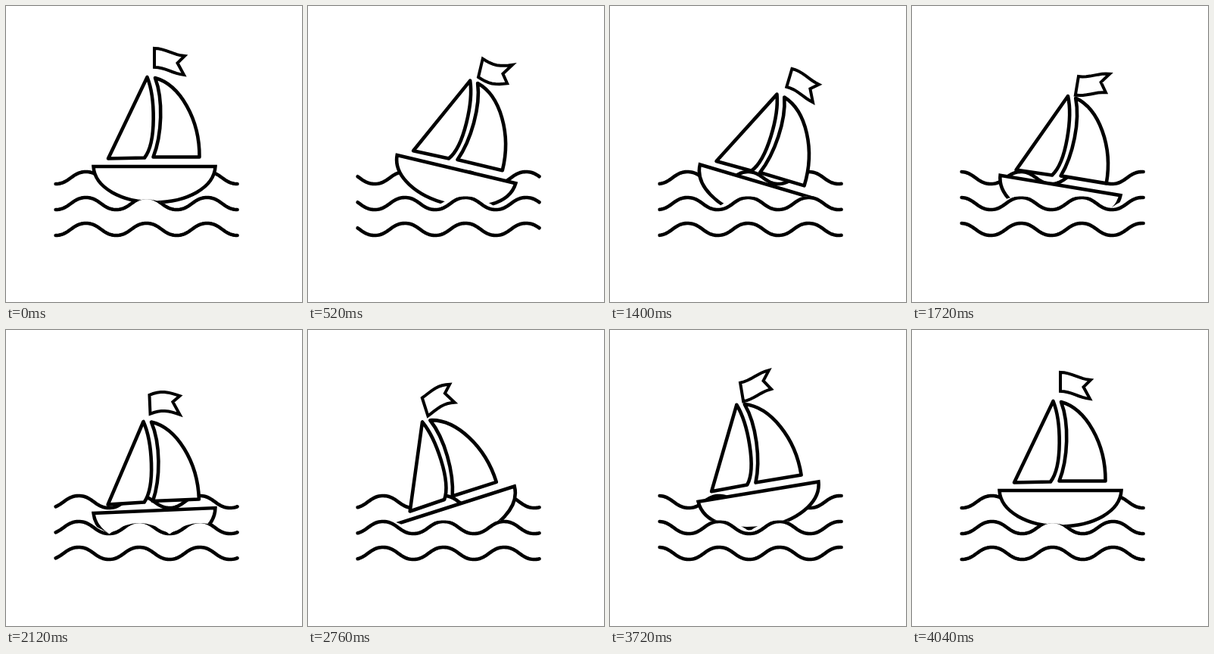
Animation of 391 by 391 pixels, one loop 4.08 s. Source, as an HTML page with a canvas:

```html
<!DOCTYPE html>
<html lang="en">
<head>
<meta charset="utf-8">
<title>Sailing boat</title>
<style>
html, body { margin: 0; width: 100%; height: 100%; overflow: hidden; background: #fff; }
canvas { display: block; width: 391px; height: 391px; }
</style>
</head>
<body>
<canvas id="sea" width="391" height="391"></canvas>
<script>
const ctx = document.getElementById('sea').getContext('2d');
const TAU = Math.PI * 2;
const LOOP = 4080, STEP = 40, SWING = 4000;
const LENGTH = 80, LEFT = 65.6, RIGHT = 305.6, CREST = 105.6;
const LINE = 4.6;

// Boat parts are drawn around the middle of the deck.
const hull = new Path2D('M-80.5 0H80.5C79 28 43 47.3 0 47.3S-79 28-80.5 0Z');
const jib = new Path2D('M-9.5-118L-61-10.5L-13-11.5C3-32 1-92-9.5-118Z');
const mainsail = new Path2D('M1-117C34-108 60-62 59.5-12.5H-1.5C10-42 12-88 1-117Z');

// Flutter of the flag: share of the loop, cycles done
const flutter = [[0, 0], [.25, 1.5], [.42, 2.5], [.52, 3.19], [.68, 4.34], [.83, 4.92], [1, 6]];

function cyclesAt(u) {
  const i = Math.max(1, flutter.findIndex(p => p[0] >= u));
  const [u0, c0] = flutter[i - 1], [u1, c1] = flutter[i];
  return c0 + (c1 - c0) * (u - u0) / (u1 - u0);
}

function shape(path, width, join) {
  ctx.lineWidth = width;
  ctx.lineJoin = join;
  ctx.fill(path);
  ctx.stroke(path);
}

// A sine with slightly broadened crests
function wave(mid, crest) {
  ctx.beginPath();
  for (let x = LEFT; x <= RIGHT; x += 2) {
    const a = (x - crest) / LENGTH * TAU;
    ctx.lineTo(x, mid - 8 * (1.04 * Math.cos(a) - .04 * Math.cos(3 * a)));
  }
  ctx.lineWidth = LINE;
  ctx.lineCap = 'round';
  ctx.lineJoin = 'round';
  ctx.stroke();
}

function flag(phase) {
  const path = new Path2D();
  const add = (x, y) => path.lineTo(x, y - 5 * Math.cos(Math.PI * x / 42 - phase));
  for (let i = 0; i <= 8; i++) add(40 * i / 8, -151);
  add(30.5, -140);
  for (let i = 8; i >= 0; i--) add(39 * i / 8, -126);
  path.closePath();
  return path;
}

// Keeps the hull above rounded humps of water with sharp valleys.
function clipToWater(top, crest) {
  ctx.beginPath();
  ctx.moveTo(0, 0);
  for (let x = 0; x <= 391; x++) {
    const d = (x - crest) / LENGTH;
    const off = 2 * (d - Math.round(d));
    ctx.lineTo(x, top + 14.5 * off * off);
  }
  ctx.lineTo(391, 0);
  ctx.clip();
}

function draw(time) {
  const step = Math.floor(time % LOOP / STEP) * STEP;
  const u = Math.max(0, step - STEP) / SWING;
  const crest = CREST - 6 * LENGTH * u;
  const tilt = 19.6 * Math.sin(TAU * u);
  const deck = 212 + 13.3 * (1 - Math.cos(TAU * u));
  const pose = () => {
    ctx.translate(196, deck);
    ctx.rotate(tilt * Math.PI / 180);
  };

  ctx.fillStyle = '#fff';
  ctx.strokeStyle = '#000';
  ctx.fillRect(0, 0, 391, 391);
  for (const mid of [227, 261, 295]) wave(mid, crest);

  ctx.save();
  clipToWater(255.5 - 4 * Math.min(1, (tilt / 8) ** 2), crest);
  pose();
  shape(hull, LINE, 'miter');
  ctx.restore();

  ctx.save();
  pose();
  shape(jib, LINE, 'round');
  shape(mainsail, LINE, 'round');
  shape(flag(TAU * cyclesAt(u)), 4, 'miter');
  ctx.restore();
}

const start = performance.now();
function tick() {
  draw(performance.now() - start);
  requestAnimationFrame(tick);
}
tick();
</script>
</body>
</html>
```
